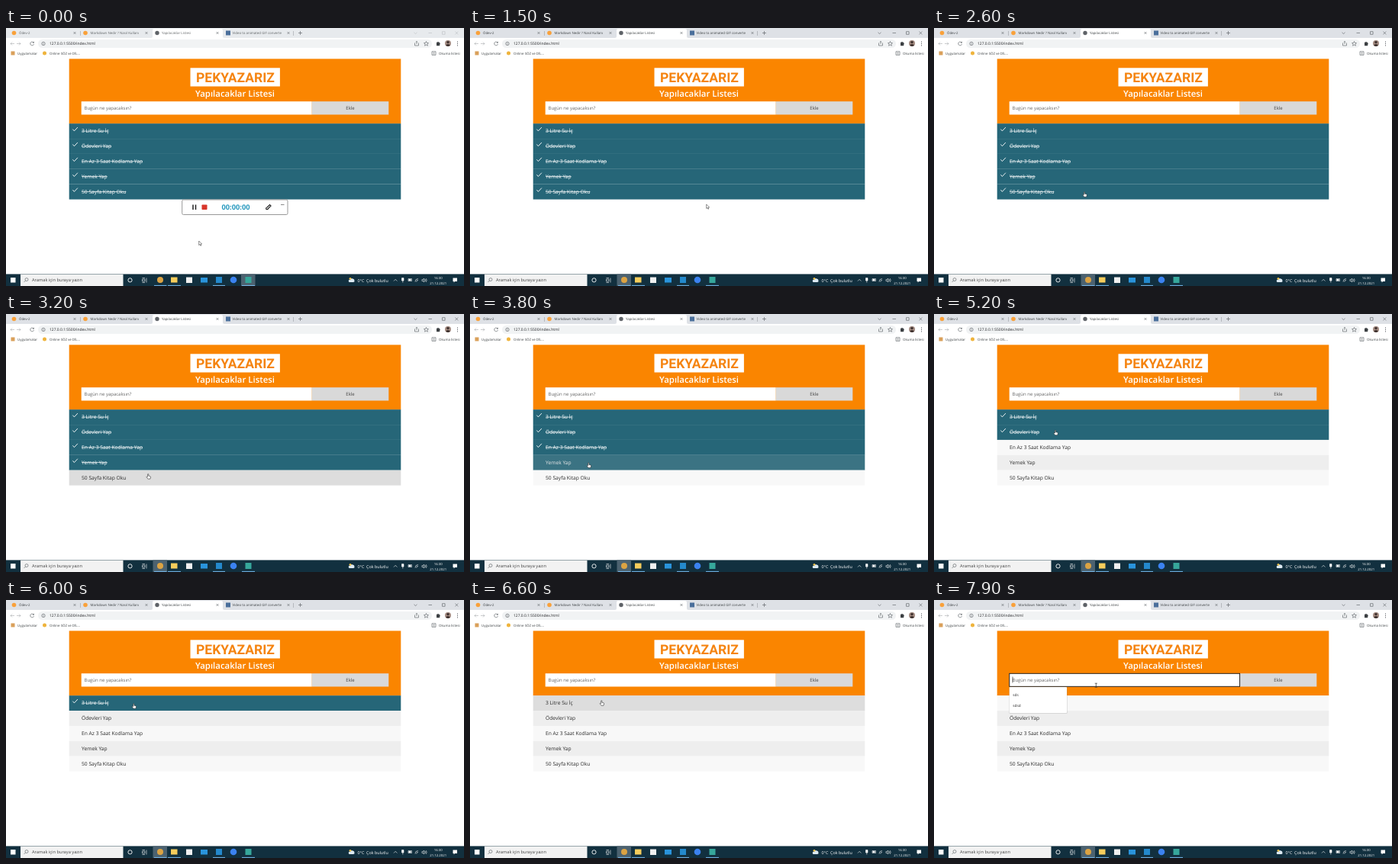
Recreate the animation shown at these times as an HTML page. Size 600 px wide and 338 px high, loop 8 s.

```html
<!DOCTYPE html>
<html lang="tr">
<head>
<meta charset="utf-8">
<title>Yapılacaklar Listesi</title>
<style>
  html, body { margin: 0; width: 100%; height: 100%; overflow: hidden; background: #fff; }
  svg { display: block; width: 100vw; height: 100vh; }
  text { font-family: "Open Sans", "Noto Sans", sans-serif; text-rendering: geometricPrecision; white-space: pre; }
  .ui { font-size: 4.4px; fill: #3c4043; }
  .item { font-size: 6.7px; }
  .form { font-size: 6px; fill: #666; }
  .line { fill: none; stroke: #5f6368; stroke-width: .65; }
  .light { fill: none; stroke: #fff; stroke-width: .6; }
  .bold { stroke-width: .9; }
  .faint { opacity: .5; }
</style>
</head>
<body>
<svg viewBox="0 0 600 338" preserveAspectRatio="none">
  <!-- Browser frame -->
  <rect id="strip" width="600" height="13"/>
  <path d="M190 13q2 0 2-2V3q0-2 2-2h88q2 0 2 2v8q0 2 2 2z" fill="#fff"/>
  <path d="M97.5 4v6M376.500 4v6" class="line faint"/>
  <circle cx="10.500" cy="6.500" r="2.800" fill="#f9a13a"/>
  <circle cx="104" cy="6.500" r="2.800" fill="#f9a13a"/>
  <circle cx="198" cy="6.500" r="2.700" fill="#5f6368"/>
  <rect x="288" y="3.500" width="6" height="6" fill="#4a6f9b"/>
  <g class="ui">
    <g id="tabs">
      <text x="17" y="8.200">Ödev-2</text>
      <text x="110.500" y="8.200">Markdown Nedir ? Nasıl Kullanı</text>
      <text x="204" y="8.200">Yapılacaklar Listesi</text>
      <text x="296.500" y="8.200">Video to animated GIF converte</text>
    </g>
    <text x="15" y="34.800">Uygulamalar</text>
    <text x="57" y="34.800">Online SÖZ ve DİL...</text>
    <text x="567" y="34.800">Okuma listesi</text>
  </g>
  <g id="closers" class="line"></g>
  <path class="line" d="M383 6.500h5M385.500 4v5"/>
  <path id="controls" class="line" d="M534.500 5.800l2 1.800 2-1.800M553.500 6.500h4.500M571.500 4.700h3.600v3.600h-3.600zM588.500 4.600l3.800 3.800m0-3.800l-3.800 3.800"/>

  <rect x="42" y="15" width="516" height="11" rx="5.500" fill="#f1f3f4"/>
  <path class="line" d="M36 18.900a2.400 2.400 0 1 0 .5 2.200M36.500 17.800v1.700h-1.700M535.500 19.500v3.500h5v-3.500M538 21v-3.500m-1.200 1l1.200-1 1.200 1M550.500 17.500l.9 2 2.100.2-1.600 1.400.5 2.100-1.900-1.100-1.900 1.100.5-2.100-1.600-1.400 2.100-.2z"/>
  <path class="line faint" d="M11 20.500h-5m2-2l-2 2 2 2M19 20.500h-5m3-2l2 2-2 2"/>
  <circle class="line" cx="49" cy="20.500" r="2.200"/>
  <path class="line" d="M49 20v1.600M49 18.800v.5"/>
  <text x="57" y="22.300" font-size="4.950" fill="#202124">127.0.0.1:5500/index.html</text>
  <path d="M564 18.800h1.300q.7-2 1.400 0h1.500v1.300q1.600.7 0 1.400v1.700h-4.200z" fill="#3c4043"/>
  <circle cx="579" cy="20" r="4" fill="#a58d83"/>
  <path d="M576 22.500q3-3.200 6 0-3 3-6 0" fill="#3d302d"/>
  <circle cx="579" cy="18.600" r="1.700" fill="#3d302d"/>
  <path d="M591.500 17.500v1.200m0 1.200v1.200m0 1.200v1.200" stroke="#5f6368"/>
  <rect x="6.500" y="30.500" width="5" height="5" fill="#d9a05a"/>
  <circle cx="50.500" cy="33" r="2.500" fill="#efb43c"/>
  <path class="line" d="M558 30.800h5v4.600h-5zM559.500 32.400h2M559.500 34h2"/>

  <!-- Page -->
  <rect x="82.700" y="40.400" width="434.600" height="85" fill="#fa8500"/>
  <rect x="241.500" y="52.300" width="117.400" height="24.200" fill="#fff"/>
  <text x="300.500" y="70.700" text-anchor="middle" style="font:700 17.500px Roboto,sans-serif" fill="#f58410">PEKYAZARIZ</text>
  <text x="300" y="90.300" text-anchor="middle" font-size="11.400" font-weight="600" fill="#fff">Yapılacaklar Listesi</text>
  <rect x="98.700" y="96.200" width="302" height="17.300" fill="#fff"/>
  <rect x="400.700" y="96.200" width="100.600" height="17.300" fill="#d9d9d9"/>
  <text class="form" x="102.500" y="107.200">Bugün ne yapacaksın?</text>
  <text class="form" x="451" y="107.200" text-anchor="middle" style="fill:#444">Ekle</text>
  <g id="rows"></g>
  <rect id="focus" x="98.800" y="96.300" width="301.800" height="17" fill="none" stroke="#111" stroke-width=".9"/>
  <path id="caret" d="M103 100.500v8" stroke="#111" stroke-width=".6"/>
  <g id="suggestions">
    <rect x="98.300" y="114" width="76.400" height="34.800" rx="1" fill="#999" opacity=".35"/>
    <rect x="98.800" y="114" width="75.200" height="34" rx=".8" fill="#fff"/>
    <text x="103.300" y="125.600" font-size="4.700" fill="#222">sds</text>
    <text x="103.300" y="139.600" font-size="4.700" fill="#222">sdsd</text>
  </g>

  <!-- Recorder bar -->
  <g id="recorder">
    <rect x="230.700" y="225" width="138.300" height="19.500" rx="1.800" fill="#fff" stroke="#999"/>
    <path d="M245 231.500v6.500M248.500 231.500v6.500" stroke="#222" stroke-width="1.500"/>
    <rect x="256.500" y="231.500" width="7" height="6.500" rx=".8" fill="#d8352a"/>
    <text x="301" y="238.200" text-anchor="middle" font-size="9.300" font-weight="700" fill="#2a9abf">00:00:00</text>
    <path d="M341 237.500q-1-2 1-2.500l3.500-3.500 1.500 1.500-3.500 3.500q-.5 1.500-2.500 1z" fill="none" stroke="#222" stroke-width="1.200"/>
    <path d="M360 231.500h4.500" stroke="#555" stroke-width=".7"/>
  </g>

  <!-- Taskbar -->
  <rect y="322.400" width="600" height="16" fill="#12303f"/>
  <rect x="6" y="327" width="6.500" height="6.500" fill="#fff"/>
  <rect x="19" y="322.700" width="134.500" height="15.300" fill="#f2f2f2"/>
  <circle class="line" cx="27" cy="329.500" r="2"/>
  <path class="line" d="M25.500 331l-2 2"/>
  <text x="34" y="332.300" font-size="5.700" fill="#444">Aramak için buraya yazın</text>
  <circle class="light bold" cx="162.500" cy="330.300" r="2.600"/>
  <path class="light" d="M178.500 327.500h3.500M178.500 329.200h3.500v2.600h-3.500zM178.500 333.500h3.500M184 327.500v6"/>
  <rect id="active" y="322.400" width="18.500" height="16" fill="#4c6270"/>
  <circle cx="202" cy="330" r="4" fill="#dca343"/>
  <rect x="216" y="326.500" width="8.500" height="7" fill="#f5cd5c"/>
  <rect x="236" y="326.500" width="8" height="7.500" fill="#f0f0f0"/>
  <rect x="255" y="327" width="9" height="6.500" fill="#2a94dc"/>
  <rect x="275" y="326" width="8" height="8" fill="#2489cc"/>
  <circle cx="298" cy="330" r="4.300" fill="#3b82f0"/>
  <rect x="313.500" y="326" width="8" height="8" fill="#36a79b"/>
  <path d="M194 337.400h16.500M212 337.400h17M271 337.400h16M309 337.400h17" stroke="#76b9ed"/>
  <path d="M449 332.500q-1-3 2-3 1-2.500 3.500-1 2 .2 2 2.500.5 2-1.500 2h-4q-1.500 0-2-.5z" fill="#dce9f2"/>
  <circle cx="451" cy="328.300" r="1.400" fill="#f2c14b"/>
  <g fill="#fff" font-size="5.400">
    <text x="460.500" y="332.500">0°C</text>
    <text x="472" y="332.500">Çok bulutlu</text>
    <g font-size="4.300" text-anchor="middle">
      <text x="566.200" y="328.800">16:30</text>
      <text x="566.200" y="336.300">21.12.2021</text>
    </g>
  </g>
  <path class="light" d="M508 331.500l2.200-2.200 2.200 2.200M518.500 327.500h2.500v3.500h-2.500zM519.800 331v2.500M527 328.500h4.500v3h-4.500zM536 332.500q0-4 4-4M537.800 332.500q0-2.200 2.200-2.200M545 329.500h1.200l1.500-1.500v5l-1.500-1.500h-1.200zM549 329q1 1.300 0 3M550.300 328.200q1.600 2.200 0 4.600"/>
  <path d="M527.500 329h3v2h-3zM518.500 327.500h2.500v3.500h-2.500zM585.500 327.500h5.500v4.500h-3l-1.300 1.500v-1.500h-1.200z" fill="#fff"/>

  <!-- Pointer: hot spot at 0,0 -->
  <g id="pointer">
    <path data-kind="arrow" d="M0 0v5.500l1.300-1.100.9 1.900.9-.4-.9-1.900h1.700z" fill="#fff" stroke="#333" stroke-width=".55"/>
    <path data-kind="hand" d="M-.6 .4q.6-.7 1.200 0v2.300l2.200.5q.7.300.5 1.200l-.6 2.300h-3l-1.900-2.500q0-1 1.600-.2z" fill="#fff" stroke="#111" stroke-width=".5"/>
    <path data-kind="beam" d="M-1.600-2.500h3.200M0-2.500v5M-1.600 2.500h3.200" fill="none" stroke="#333" stroke-width=".7"/>
  </g>
</svg>
<script>
const LOOP = 8000, STEP = 100, FADE = 200, MINIMISE = 1000;
const ROW_TOP = 125.2, ROW_HEIGHT = 19.87;
const TEAL = [38, 102, 120], HOVER = [221, 221, 221], WHITE = [255, 255, 255], INK = [42, 42, 42];
const ODD = [248, 248, 248], EVEN = [238, 238, 238];
const $ = id => document.getElementById(id);

const tasks = [
  { label: '3 Litre Su İç', click: 6300, leave: 6650 },
  { label: 'Ödevleri Yap', click: 5250, leave: 5750 },
  { label: 'En Az 3 Saat Kodlama Yap', click: 4500, leave: 4900 },
  { label: 'Yemek Yap', click: 3780, leave: 4150 },
  { label: '50 Sayfa Kitap Oku', click: 2800, leave: 3250 }
];

// time, x, y
const path = [
  [0, 252.7, 279], [200, 252.7, 279], [900, 362, 231], [1150, 362, 231],
  [1500, 309.7, 231], [1800, 212, 217], [2200, 197, 214.5], [3000, 197, 214.5],
  [3600, 155.3, 194.7], [3900, 155.3, 194.7], [4400, 157.5, 171], [4700, 157.5, 171],
  [5100, 159, 152], [5500, 159, 152], [5950, 167.3, 135.5], [6450, 167.3, 135.5],
  [6800, 180, 125.5], [7000, 184, 125.3], [7300, 213, 110], [7800, 213, 110], [7900, 212.3, 111.7]
];

const clamp = v => Math.max(0, Math.min(1, v));
// Close to the CSS "ease" curve
const ease = v => 1 - (1 - clamp(v) ** 1.5) ** 3.7;
const smooth = v => v * v * (3 - 2 * v);
const mix = (a, b, k) => a.map((v, i) => v + (b[i] - v) * k);
const rgb = c => `rgb(${c.map(Math.round)})`;
const show = (el, on) => el.setAttribute('visibility', on ? 'visible' : 'hidden');

$('closers').innerHTML = [90, 184, 277, 370]
  .map(x => `<path d="M${x - 1.4} 5.1l2.800 2.800m0-2.800l-2.800 2.800"/>`).join('');

$('rows').innerHTML = tasks.map(({ label }, i) => `
  <g transform="translate(82.700 ${ROW_TOP + ROW_HEIGHT * i})">
    <rect width="434.600" height="${ROW_HEIGHT}"/>
    <text class="item" x="16.300" y="12.200">${label}</text>
    <path class="light bold" d="M4.700 7.400l2 2.300 4.500-4.800"/>
  </g>`).join('');

tasks.forEach((task, i) => {
  const [box, text, check] = $('rows').children[i].children;
  Object.assign(task, { box, text, check, base: i % 2 ? EVEN : ODD });
});

function pointerAt(t) {
  const next = path.findIndex(p => p[0] > t);
  if (next < 0) return path.at(-1).slice(1);
  const [a, b] = [path[next - 1], path[next]];
  return mix(a.slice(1), b.slice(1), smooth((t - a[0]) / (b[0] - a[0])));
}

function draw(t) {
  for (const { box, text, check, click, leave, base } of tasks) {
    const k = ease((t - click) / FADE);
    const fill = mix(mix(TEAL, HOVER, k), base, ease((t - leave) / FADE));
    box.setAttribute('fill', rgb(fill));
    text.setAttribute('fill', rgb(mix(WHITE, INK, k)));
    text.setAttribute('text-decoration', t < click ? 'line-through' : 'none');
    show(check, t < click);
  }

  // The browser window gains focus once the recorder bar is minimised
  const focused = t > MINIMISE;
  $('recorder').setAttribute('opacity', 1 - clamp((t - MINIMISE) / FADE));
  $('active').setAttribute('x', focused ? 192.5 : 308);
  $('strip').setAttribute('fill', focused ? '#dee1e6' : '#e7eaed');
  $('controls').setAttribute('opacity', focused ? 1 : .3);
  $('tabs').setAttribute('opacity', focused ? 1 : .8);

  show($('focus'), t >= 7400);
  show($('caret'), t >= 7400);
  show($('suggestions'), t >= 7500);

  const [x, y] = pointerAt(t);
  const overRows = y >= 125 && y < 224.5 && x > 83 && x < 517 && t < 6800;
  const kind = overRows ? 'hand' : t >= 7200 ? 'beam' : 'arrow';
  $('pointer').setAttribute('transform', `translate(${x} ${y})`);
  for (const shape of $('pointer').children) show(shape, shape.dataset.kind === kind);
}

const start = performance.now();
function tick() {
  const t = (performance.now() - start) % LOOP;
  draw(Math.floor(t / STEP) * STEP);
  requestAnimationFrame(tick);
}
tick();
</script>
</body>
</html>
```
